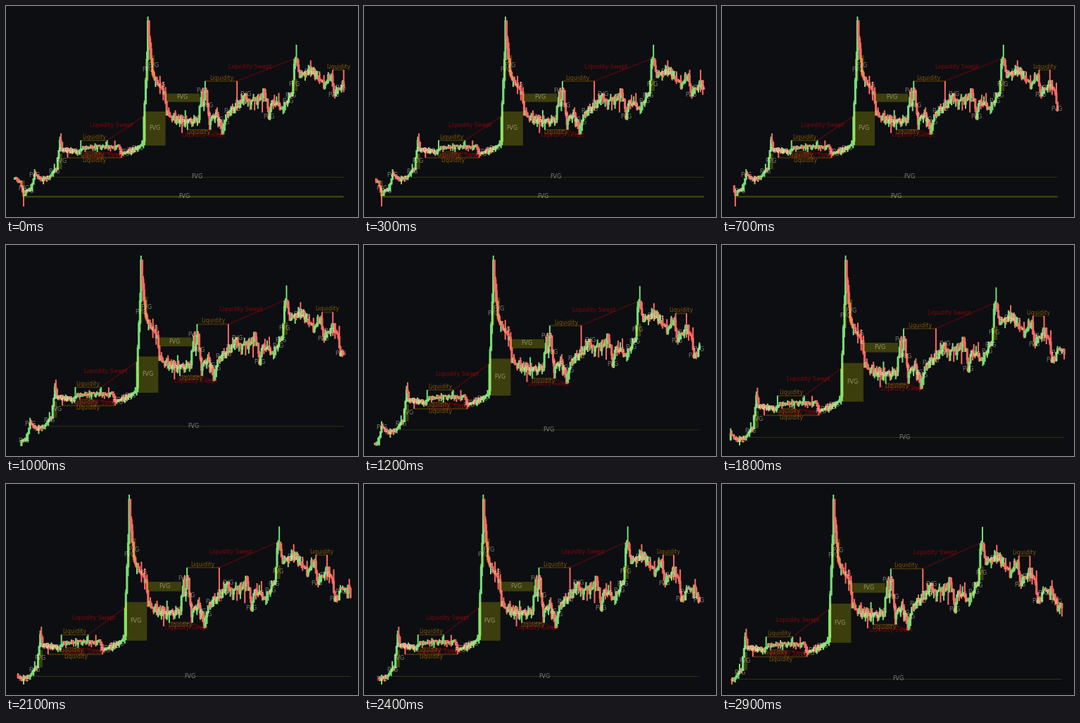
These frames come from a looping animation (500x300 px, 3000 ms). A matplotlib script:

```python
import numpy as np
import matplotlib.pyplot as plt
from matplotlib.animation import FuncAnimation
from matplotlib.collections import LineCollection
from matplotlib.patches import Rectangle

W, H, DPI = 500, 300, 100
PX = 72 / DPI
WINDOW, FRAMES = 300, 30
UP, DOWN, BACK = "#77dd76", "#ff6962", "#0c0e12"

# Turning points of the trend as (candle, price). Prices are depths below
# the top edge: a smaller value is a higher price.
TREND = [
    (0, 246), (5, 249), (8, 274), (10, 266), (16, 256), (18, 240), (24, 247),
    (30, 245), (38, 232), (41, 190), (43, 205), (56, 207), (62, 201),
    (95, 201), (98, 211), (115, 199), (117, 185), (118, 141), (121, 28),
    (125, 98), (136, 120), (138, 152), (153, 165), (167, 163), (170, 120),
    (171, 145), (173, 116), (177, 166), (182, 150), (188, 173), (194, 150),
    (202, 145), (210, 125), (214, 136), (227, 124), (231, 157), (234, 136),
    (244, 145), (252, 125), (254, 84), (256, 74), (259, 97), (270, 92),
    (281, 112), (288, 100), (290, 126), (300, 110), (304, 126), (306, 146),
    (311, 136), (321, 138), (324, 152), (328, 155),
]
PEAKS = {18: 232, 42: 181, 121: 15, 256: 55}
DIPS = {8: 285, 16: 263.7, 26: 253.5, 29: 250, 306: 150, 326: 163}

# Liquidity as (start, end, price, at_high, sweep, sweep price).
POOLS = [
    (60, 84, 191, True, 117, 157), (173, 202, 106.7, True, 254, 75),
    (157, 177, 176, False, 188, 183), (48, 97, 215.7, False, None, None),
    (64, 75, 207.5, False, 96, 211), (289, 299, 90.7, True, None, None),
]

# Wide gaps as (start, end, top, bottom); an end of None stays open.
WIDE_GAPS = [
    (7, 9, 248, 272), (9, None, 269.8, 272.5), (32, None, 243.1, 243.8),
    (40, 43, 210, 232), (117, 137, 150, 198.5), (137, 168, 124.5, 136.5),
    (124, 127, 70, 100), (120, 122, 76, 106), (252, 257, 104, 121),
]
# Middles of the short gaps, which lie on the trend.
SHORT_GAPS = np.r_[12, 18, 26, 36, 44:58:4, 99:112:4, 132, 150:168:6,
                   170:206:5, 210, 231, 237, 248, 251, 263:274:5, 290,
                   296.5, 306, 310.5, 323]


def trend(i):
    return np.interp(i, *zip(*TREND))


def make_candles():
    rng = np.random.default_rng(5)
    i = np.arange(WINDOW + FRAMES - 1)
    swing = np.where(i < 117, 2.2, 4 + 4 * np.exp((117 - i) / 12))
    close = trend(i) + swing * rng.normal(0, 0.8, i.size)

    # The first climb leaves ever higher lows behind.
    floor = np.select([i < 9, i <= 10, i <= 16, i <= 26],
                      [285, 269, 263, 253], 249)
    close = np.minimum(close, np.r_[floor[1:], 249])
    start = np.r_[246, close[:-1]]
    high = np.minimum(start, close) - swing * rng.exponential(0.8, i.size)
    low = np.maximum(start, close) + swing * rng.exponential(0.8, i.size)
    high, low = np.maximum(high, 20), np.minimum(low, floor)

    # Wicks stop at a pool's price until the sweep breaks it.
    for a, b, price, at_high, sweep, hit in POOLS:
        side, limit = (high, np.maximum) if at_high else (low, np.minimum)
        held = slice(a, sweep or b)
        side[held] = limit(side[held], price)
        side[[a, b]] = price
        if sweep:
            side[sweep] = hit
    for side, marks in (high, PEAKS), (low, DIPS):
        side[list(marks)] = list(marks.values())
    return np.clip(start, high, low), high, low, np.clip(close, high, low)


def make_gaps():
    gaps = list(WIDE_GAPS)
    for m in SHORT_GAPS:
        reach = 1 if m % 1 == 0 else 0.5
        y = trend(m) + 1
        gaps.append((int(m - reach), int(m + reach), y - 2.5, y + 2.5))
    return gaps


OPEN, HIGH, LOW, CLOSE = make_candles()
GAPS = make_gaps()

fig = plt.figure(figsize=(W / DPI, H / DPI), dpi=DPI, facecolor=BACK)
ax = fig.add_axes([0, 0, 1, 1])


def middle(a, b, first):
    """Candle halfway between two others, rounded within the window."""
    return first + round((a + b) / 2 - first)


def collect(first):
    """Labels, lines and boxes in candle and price units."""
    last = first + WINDOW - 1
    labels, lines, boxes = [], [], []
    for a, b, price, at_high, sweep, hit in POOLS:
        # A swing counts on the newest candle or once five more follow.
        if 0 < last - b < 5:
            continue
        shift = -2 if at_high else 6
        lines.append((a, price, b, price, "orange"))
        labels.append((middle(a, b, first), price, shift, "Liquidity",
                       "orange"))
        if sweep:
            lines.append((b, price, sweep, hit, "red"))
            labels.append((middle(a, sweep, first), (price + hit) / 2, shift,
                           "Liquidity Swept", "red"))
    for a, b, top, bottom in GAPS:
        if not first < a < last:
            continue
        b = last if b is None else min(b, last)
        boxes.append((a, b, top, bottom))
        labels.append((middle(a, b, first), (top + bottom) / 2, 2, "FVG",
                       "white"))
    return labels, lines, boxes


def draw(first):
    ax.cla()
    ax.set_xlim(0, W)
    ax.set_ylim(H, 0)
    ax.axis("off")
    labels, lines, boxes = collect(first)
    span = slice(first, first + WINDOW)

    # Outermost labels sit 5% in from the sides, extreme prices likewise.
    left = min(l[0] for l in labels)
    step = 450 / (max(l[0] for l in labels) - left)
    top, bottom = HIGH[span].min(), LOW[span].max()

    def px(i):
        return 25 + (i - left) * step

    def py(price):
        return 15 + (price - top) * 270 / (bottom - top)

    segments, widths, colors = [], [], []
    for i in range(first, first + WINDOW):
        x, o, c = px(i), py(OPEN[i]), py(CLOSE[i])
        segments += [[(x, py(HIGH[i])), (x, py(LOW[i]))],
                     [(x, min(o, c) - 1), (x, max(o, c) + 1)]]
        widths += [2 * PX, (2 + 0.7 * step) * PX]
        colors += [UP if c <= o else DOWN] * 2
    ax.add_collection(LineCollection(segments, linewidths=widths,
                                     colors=colors, capstyle="butt",
                                     snap=False, zorder=1))

    for x0, y0, x1, y1, color in lines:
        ax.plot([px(x0), px(x1)], [py(y0), py(y1)], color=color, alpha=0.2,
                lw=2 * PX, solid_capstyle="butt", snap=False, zorder=2)
    for i, price, shift, text, color in labels:
        ax.text(px(i), py(price) + shift, text, color=color, alpha=0.46,
                fontsize=8 * PX, family="DejaVu Sans", ha="center",
                va="baseline", zorder=3)
    for a, b, y0, y1 in boxes:
        ax.add_patch(Rectangle((px(a), py(y0)), px(b) - px(a),
                               py(y1) - py(y0), fc="yellow", alpha=0.2,
                               lw=0, snap=False, zorder=4))
    return []


anim = FuncAnimation(fig, draw, frames=FRAMES, interval=100, repeat=True,
                     repeat_delay=0, init_func=lambda: [])
plt.show()
```
